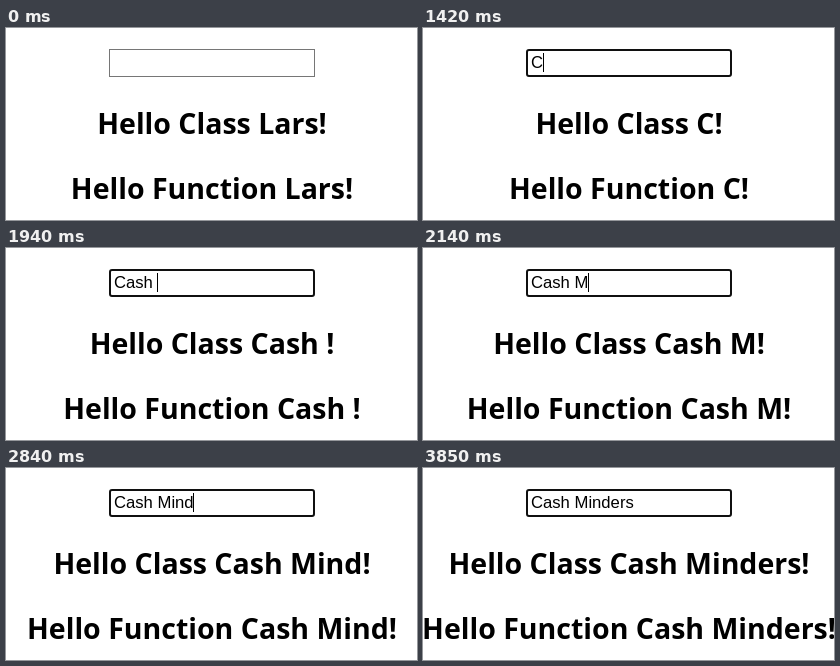
An HTML page that plays this animation: 411x192 px, repeating every 4130 ms.

```html
<!DOCTYPE html>
<html lang="en">
<head>
<meta charset="utf-8">
<title>Greeting input</title>
<style>
  html, body { margin: 0; width: 100%; height: 100%; overflow: hidden; background: #fff; }
  svg { display: block; width: 411px; height: 192px; }
  text { white-space: pre; fill: #000; }
  .greeting { font: 700 28.5px "Open Sans", "Noto Sans", sans-serif; text-anchor: middle; }
  #typed { font: 16.667px "Liberation Sans", Arial, sans-serif; }
</style>
</head>
<body>
<svg viewBox="0 0 411 192">
  <rect id="box" fill="#fff"/>
  <text id="typed" x="108" y="40"></text>
  <rect id="caret" width="1" height="19"/>
  <text id="classLine" class="greeting" x="206" y="106"></text>
  <text id="functionLine" class="greeting" x="206" y="171"></text>
  <path id="arrow" d="M.5 .5V16.5L4.3 13L6.8 18.5L9 17.5L6.6 12H11.8Z" fill="#fff" stroke="#000"/>
  <path id="beam" d="M-3 -8.5H-1L0 -7.5L1 -8.5H3M0 -7.5V7.5M-3 8.5H-1L0 7.5L1 8.5H3" fill="none" stroke="#000"/>
</svg>
<script>
const LOOP = 4130;
const DEFAULT_NAME = "Lars";
const TYPED_NAME = "Cash Minders";
const FOCUS_TIME = 610;

// When each letter of the typed name appears.
const keyTimes = [1420, 1590, 1700, 1860, 1940, 2140, 2280, 2420, 2840, 3010, 3170, 3340];

// Spans in which the text caret is lit.
const caretSpans = [[FOCUS_TIME, 1090], [1420, 3850]];

// [time, shape, x, y]
const pointerSteps = [
  [0, "none", 0, 0],
  [30, "arrow", 326, 115], [80, "arrow", 312, 91], [130, "arrow", 297, 69], [170, "arrow", 283, 52],
  [220, "beam", 272, 40], [270, "beam", 267, 35],
  [540, "beam", 266, 32], [580, "beam", 265, 28], [FOCUS_TIME, "beam", 264, 26],
  [650, "none", 0, 0]
];

const byId = id => document.getElementById(id);
const setAttrs = (el, attrs) => {
  for (const key in attrs) el.setAttribute(key, attrs[key]);
};
const show = (el, visible) => el.setAttribute("visibility", visible ? "visible" : "hidden");

function drawBox(focused, hovered) {
  const line = focused ? 2 : 1;
  setAttrs(byId("box"), {
    x: 103 + line / 2, y: 21 + line / 2,
    width: 206 - line, height: 28 - line,
    rx: focused ? 2 : 0,
    "stroke-width": line,
    stroke: focused ? "#101010" : hovered ? "#4f4f4f" : "#767676"
  });
}

function drawCaret(typed, lit) {
  const width = typed ? byId("typed").getComputedTextLength() : 0;
  setAttrs(byId("caret"), { x: Math.floor(108 + width), y: typed ? 25 : 26 });
  show(byId("caret"), lit);
}

function drawPointer(shape, x, y) {
  for (const id of ["arrow", "beam"]) {
    show(byId(id), id === shape);
    byId(id).setAttribute("transform", `translate(${x + (id === "beam" ? 0.5 : 0)} ${y})`);
  }
}

function draw(time) {
  const typed = TYPED_NAME.slice(0, keyTimes.filter(t => t <= time).length);
  const name = typed || DEFAULT_NAME;
  const [, shape, x, y] = pointerSteps.filter(([t]) => t <= time).pop();

  drawBox(time >= FOCUS_TIME, shape === "beam");
  byId("typed").textContent = typed;
  byId("classLine").textContent = `Hello Class ${name}!`;
  byId("functionLine").textContent = `Hello Function ${name}!`;
  drawCaret(typed, caretSpans.some(([from, to]) => time >= from && time < to));
  drawPointer(shape, x, y);
}

const start = performance.now();
function tick() {
  draw((performance.now() - start) % LOOP);
  requestAnimationFrame(tick);
}
tick();
</script>
</body>
</html>
```
